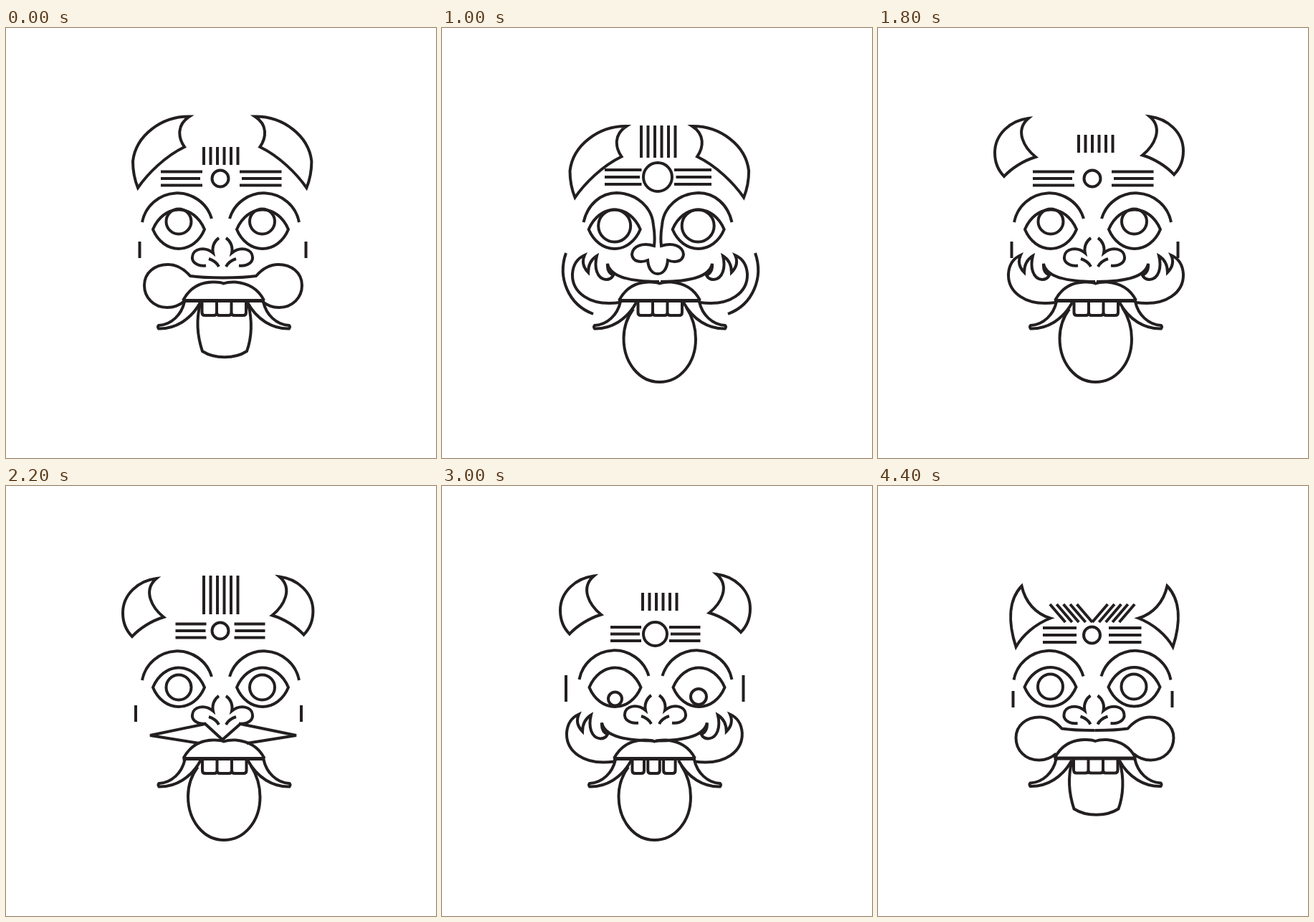
Animation, 600 px wide and 600 px high, one loop 4.6 s. Source, as an HTML page:

```html
<!DOCTYPE html>
<html lang="en">
<head>
<meta charset="utf-8">
<title>Masks</title>
<style>
  html, body { margin: 0; width: 100%; height: 100%; overflow: hidden; background: #fff; }
  svg { display: block; width: 100%; height: 100%; fill: none; stroke: #231f20; stroke-width: 4; }
</style>
</head>
<body>
<svg id="mask" viewBox="0 0 600 600"></svg>
<script>
const STEP = 200;

const path = (d, dx = 0, dy = 0, extra = '') =>
  `<path d="${d}" transform="translate(${dx} ${dy})" ${extra}/>`;
const circle = (x, y, r) => `<circle cx="${x}" cy="${y}" r="${r}"/>`;

// A left-hand shape, shifted, plus its reflection about x = axis.
const pair = (d, axis, dx = 0, dy = 0, rightDy = 0) => path(d, dx, dy) +
  `<path d="${d}" transform="translate(${2 * axis - dx} ${dy + rightDy}) scale(-1 1)"/>`;

const range = (n, draw) => Array.from({ length: n }, (_, i) => draw(i)).join('');

const HORNS = {
  long: 'M256 123.5C217 123 181 150 177 186C177 202 180 213 184 223C198 203 222 179 249 166C240 153 238 135 256 123.5Z',
  point: 'M195 141C175 162 177 195 187 226C196 210 214 194 235 186C215 180 200 164 195 141Z',
  stub: 'M210 129C185 132 163 151 163 177C163 190 168 202 176 210C186 199 203 188 220 183C204 170 190 146 210 129Z'
};
const horns = (kind, axis, dx = 0, dy = 0) =>
  pair(HORNS[kind], axis, dx, dy, kind === 'stub' ? -2.5 : 0);

const bars = (x, top, bottom) => path(range(6, i => `M${x + 9.5 * i} ${top}V${bottom}`));
const chevron = (axis, top, count) => path(range(count, i => {
  const near = 9.4 * i, far = near + 21.5;
  return `M${axis - far} ${top}L${axis - near} ${top + 25}M${axis + far} ${top}L${axis + near} ${top + 25}`;
}));

// Ring with three stripes on each side; the middle stripe ends `shift` nearer the ring.
const band = (x, y, r, left, innerL, innerR, right, shift = 0, gap = 9.5) => circle(x, y, r) +
  path([-1, 0, 1].map(row => {
    const s = row ? 0 : shift, rowY = y + row * gap;
    return `M${left} ${rowY}H${innerL + s}M${innerR - s} ${rowY}H${right}`;
  }).join(''));

const brows = (axis, dx = 0, dy = 0) => pair('M190 271A50 50 0 0 1 287 266', axis, dx, dy);
const nose = (axis, dx = 0, dy = 0) =>
  pair('M279 331.5C266 333 259 326 260 319C261 308 277 304 289 314C287 305 291 297 297 293' +
       'M283 322C289 324 294 327 297 333', axis, dx, dy);
const joinedNose = () =>
  pair('M197.5 271C203 246 222 230 244 230C272 231 293 250 295 275C297 287 297 296 296 304' +
       'C280 299 266 304 265 316C266 326 277 328 287 324C288 337 294 343 301 343', 301);

const ALMOND = 'M205 281C212 264 226 253.5 241 253.5C256 253.5 270 264 277 281C270 298 256 308 241 308C226 308 212 298 205 281Z';
const eyes = (dx, dy, y, r, rightY = y, rightR = r) =>
  path(ALMOND, dx, dy) + path(ALMOND, dx + 117, dy) +
  circle(241 + dx, y, r) + circle(357.5 + dx, rightY, rightR);

const ticks = (left, right, top, bottom) => path(`M${left} ${top}V${bottom}M${right} ${top}V${bottom}`);
const cheeks = (axis, dx = 0, dy = 0) =>
  pair('M173 314C161 348 176 386 211 399', axis, dx, dy);

const bulbs = (dx = 0, dy = 0) =>
  pair('M249 381C242 387 234 390 225 390C206 390 193 376 193 359C193 341 208 330 226 330' +
       'C240 330 250 338 257 346C270 348 285 348.5 303 348.5', 303 + dx, dx, dy);
const curls = (axis, dx = 0, dy = 0) =>
  pair('M248 383C205 389 181 368 182 343C183 329 190 321 199 317C194 328 199 336 204 341' +
       'C204 331 208 323 216 318C212 334 216 350 229 351Q236 351 239 345Q230 341 231 329' +
       'C235 349 268 354 303 354', axis, dx, dy);
const deepSpikes = () => path('M270 359L201 348L278 332L302 354L327 332L405 348L336 359');
const flatSpikes = () => path('M266 361L195 349L275 340L288 332.5H301L317 340L399 349L327 361');

const TONGUES = {
  flat: 'M271 385C265 408 267 430 274 451C291 462 319 462 336 451C343 432 344 408 338 386',
  round: 'M267 392C256 407 253.5 420 253.5 433C253.5 468 276 494 303.5 494C332 494 354 468 354 434C354 420 350 404 341 390',
  fork: 'M269 383C265 399 265 424 271 448C273 453 276 453 279 449C288 436 296 429 304 429C314 429.5 321 438 327 448C330 453 334 453 335 449C342 427 343 404 337 384',
  longFork: 'M269 383C264 405 265 437 271 463C273 469 276 469 279 464C288 449 296 443 304 443C314 444 321 453 327 463C330 469 334 469 335 464C342 437 343 405 337 384'
};
const LIP = 'M247 380C256 363 271 355 288 354.5Q298 354 303.5 356.5Q310 354 320 354.5C337 356 352 364 360 380';
const TUSK = 'M249 382C245 400 231 414 213 415Q211 417 213 419.5C236 420 258 407 271 383';
const mouth = (tongue, dx = 0, dy = 0, gappy = false) => {
  const width = gappy ? 16.5 : 20.5, first = gappy ? 272.5 : 273.5, pitch = gappy ? 21.8 : 20.5;
  const teeth = range(3, i =>
    `M${first + pitch * i} 381v16q0 4 4 4h${width - 8}q4 0 4 -4v-16`);
  return path(LIP, dx, dy) + path('M246 380.5H361', dx, dy, 'stroke-width="5"') +
    path(teeth, dx, dy) + pair(TUSK, 304 + dx, dx, dy) + path(TONGUES[tongue], dx, dy);
};

const PARTS = ['horns', 'crest', 'band', 'face', 'eyes', 'sides', 'whiskers', 'mouth'];

const poses = [
  {
    horns: horns('long', 301.7),
    crest: bars(276, 166, 191),
    band: band(299, 210, 11.5, 216, 274, 326, 384.5, -3),
    face: brows(299.5) + nose(302),
    eyes: eyes(0, 0, 270, 17.5),
    sides: ticks(186.5, 418.5, 298, 321),
    whiskers: bulbs(),
    mouth: mouth('flat')
  },
  {
    horns: horns('long', 303.3, 1.5, 13.5),
    crest: bars(278, 136, 181),
    band: band(301, 208, 20, 227, 278.5, 324, 376, -2.5, 10),
    face: joinedNose(),
    eyes: eyes(-.3, 0, 276, 22.5),
    sides: cheeks(305),
    whiskers: curls(304),
    mouth: mouth('round')
  },
  {
    horns: horns('point', 296.6),
    crest: chevron(297, 167, 6),
    band: band(297, 212.5, 11.5, 234.5, 277, 317, 360),
    face: brows(299.5, 0, 1) + nose(296.5, -6, .5),
    eyes: eyes(0, 1, 282, 28),
    sides: cheeks(297.7, 11, -5),
    whiskers: flatSpikes(),
    mouth: mouth('fork', -9.5, 1)
  },
  {
    horns: horns('stub', 295.7),
    crest: bars(276, 125, 179),
    band: band(299, 202, 11.5, 236.5, 279.5, 318.5, 361.5, -1),
    face: brows(299.5) + nose(302),
    eyes: eyes(0, 0, 281, 17.5),
    sides: ticks(181, 412, 306, 329),
    whiskers: deepSpikes(),
    mouth: mouth('round', .5, 0)
  },
  {
    horns: horns('stub', 297.5, 2, -3.5),
    crest: bars(280, 149, 174),
    band: band(297.5, 206.5, 16.5, 235, 278, 317, 360.5, -2),
    face: brows(298, 1.5, -1) + nose(297.5, -5, -1),
    eyes: eyes(.5, 0, 297, 9.5, 294, 11),
    sides: ticks(173, 420.5, 264, 301),
    whiskers: curls(296.4, -8, 1.5),
    mouth: mouth('round', -7, 0, true)
  },
  {
    horns: horns('point', 302, 5.5, -1.5),
    crest: chevron(299, 165, 5),
    band: band(298.5, 208, 11.5, 230, 277, 322, 367.5, 0, 10),
    face: brows(299, -.5, -.5) + nose(301.5, -.5, -.5),
    eyes: eyes(-.5, -.5, 280, 17.5),
    sides: ticks(188.5, 410.5, 286, 309),
    whiskers: bulbs(-.5, -7.5),
    mouth: mouth('flat', -.5, -.5)
  }
];

// Each digit names the pose that lends the part at that place in PARTS.
const mix = (digits, changes = {}) => ({
  ...Object.fromEntries(PARTS.map((part, i) => [part, poses[digits[i]][part]])),
  ...changes
});

const sequence = [
  poses[0],
  mix('22535533', { mouth: mouth('fork') }),
  mix('10003101', { sides: cheeks(310), mouth: mouth('longFork', 0, 8) }),
  mix('34440440', { horns: horns('stub', 295, -2.5, -12), mouth: mouth('flat', -7, 0, true) }),
  mix('00335130', { horns: horns('long', 301.7, 0, 2), sides: cheeks(302, -3) }),
  poses[1],
  mix('25053105', { horns: horns('point', 302, 5.5, -6), sides: cheeks(304.5, -.5), mouth: mouth('longFork') }),
  poses[2],
  mix('52304533', { horns: horns('point', 299.5, 3), mouth: mouth('longFork') }),
  mix('34030011', { horns: horns('stub', 294.5, 0, -3) }),
  mix('04505050', { horns: horns('long', 301.7, 0, 3) }),
  poses[3],
  mix('52030305', { mouth: mouth('fork') }),
  mix('00351510', { horns: horns('long', 307.5, 6, 7), mouth: mouth('longFork') }),
  mix('25220222', { sides: cheeks(294, -11) }),
  poses[4],
  mix('52533531'),
  mix('50305001', { horns: horns('point', 301, 4, -21) }),
  poses[1],
  mix('34030303', { horns: horns('stub', 299, 2, 8) }),
  mix('12503510', { mouth: mouth('fork') }),
  mix('30505050', { horns: horns('stub', 301, 5, -1), mouth: mouth('longFork') }),
  poses[5]
].map(frame => PARTS.map(part => frame[part]).join(''));

const mask = document.getElementById('mask');
const start = performance.now();
let shown = -1;

function draw() {
  const index = Math.floor((performance.now() - start) / STEP) % sequence.length;
  if (index !== shown) {
    mask.innerHTML = sequence[index];
    shown = index;
  }
  requestAnimationFrame(draw);
}
draw();
</script>
</body>
</html>
```
